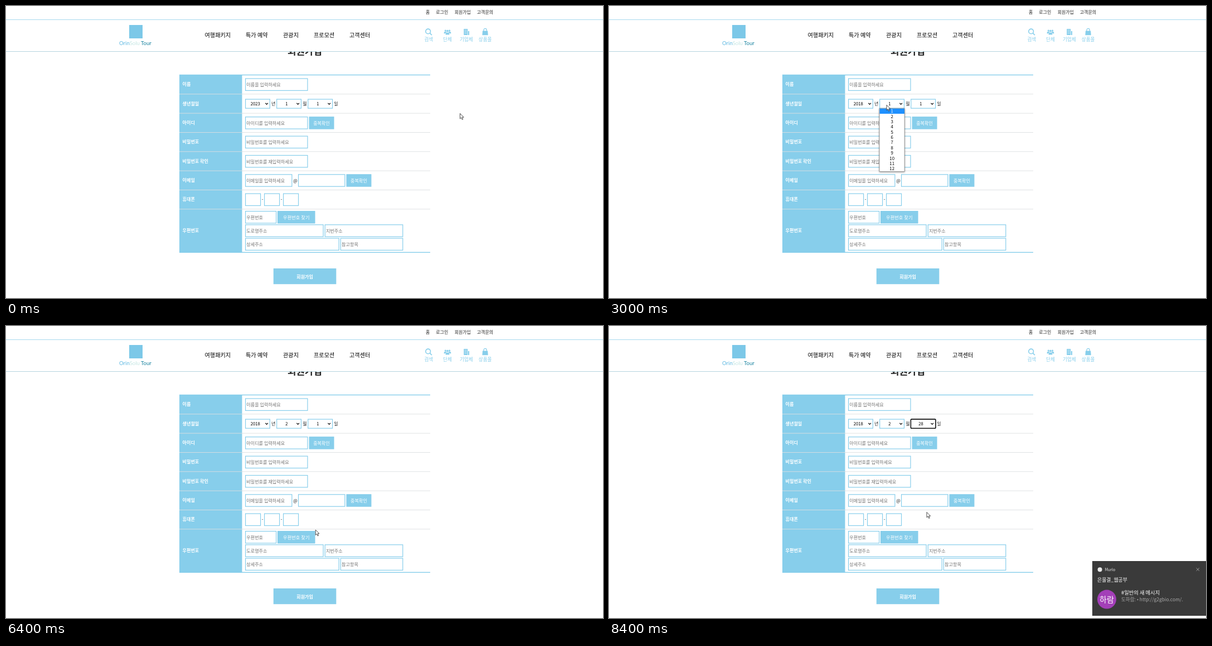
An HTML page that plays this animation: 1071 by 523 pixels, repeating every 8.47 s.

```html
<!DOCTYPE html>
<html>
<head>
<meta charset="utf-8">
<title>회원가입</title>
<style>
html, body { margin: 0; width: 100%; height: 100%; overflow: hidden; background: #fff; }
svg { display: block; }
text { font-family: "Noto Sans CJK KR", "Noto Sans CJK", "Noto Sans", sans-serif; white-space: pre; }
.list { filter: drop-shadow(0 1px 1.5px rgba(0, 0, 0, .4)); }
</style>
</head>
<body>
<svg id="stage" width="1071" height="523" viewBox="0 0 1071 523"></svg>
<script>
const SKY = '#87ceeb', GREY = '#757575', LOOP = 8470;
const ROW = 9.38, LIST_TOP = 183.6, VISIBLE = 20;
const stage = document.getElementById('stage');
const $ = id => document.getElementById(id);

// cy is the vertical middle of the glyphs
function text(x, cy, str, size, { fill = '#222', weight = 400, anchor = 'start', extra = '' } = {}) {
  return `<text x="${x}" y="${cy + size * .37}" font-size="${size}" fill="${fill}" font-weight="${weight}" text-anchor="${anchor}" ${extra}>${str}</text>`;
}
function rect(x, y, w, h, fill, extra = '') {
  return `<rect x="${x}" y="${y}" width="${w}" height="${h}" fill="${fill}" ${extra}/>`;
}
function outline(x, y, w, h) {
  return rect(x + .6, y + .6, w - 1.2, h - 1.2, '#fff', `stroke="${SKY}" stroke-width="1.2"`);
}
function button(x, y, w, h, label, size = 8.15, weight = 400) {
  return rect(x, y, w, h, SKY) +
    text(x + w / 2, y + h / 2 + .5, label, size, { fill: '#fff', anchor: 'middle', weight });
}

// x, y, width, placeholder
const INPUT_H = 22.6;
const inputs = [
  [429, 129.4, 112.6, '이름을 입력하세요'],
  [429, 198.1, 112.6, '아이디를 입력하세요'],
  [429, 232.5, 112.6, '비밀번호를 입력하세요'],
  [429, 266.9, 112.6, '비밀번호를 재입력하세요'],
  [429, 301.2, 84.5, '이메일을 입력하세요'],
  [524, 301.2, 84.5, ''],
  [429, 335.5, 28.2, ''], [463, 335.5, 28.2, ''], [497, 335.5, 28.2, ''],
  [429, 367, 56.3, '우편번호'],
  [429, 391.2, 140.7, '도로명주소'], [571.7, 391.2, 140.7, '지번주소'],
  [429, 415.4, 168.9, '상세주소'], [599.8, 415.4, 112.6, '참고항목']
];

function header() {
  const nav = [[356.5, '여행패키지'], [430, '특가 예약'], [497, '관광지'], [552, '프로모션'], [616, '고객센터']];
  const top = [[753, '홈'], [771.3, '로그인'], [804.7, '회원가입'], [844.8, '고객문의']];
  const tools = [[758.3, '검색'], [792, '단체'], [825.8, '기업체'], [859.6, '상품몰']];
  const person = (x, y, s) => `<g transform="translate(${x} ${y}) scale(${s})"><circle cy="-3" r="2.2"/><path d="M-3.6 4V2a2.4 2.4 0 0 1 2.4-2.4h2.4A2.4 2.4 0 0 1 3.6 2V4Z"/></g>`;
  const windows = [0, 1, 2].map(r => [0, 1].map(c =>
    rect(823.2 + c * 2.3, 42.6 + r * 2.7, 1.1, 1.3, '#fff')).join('')).join('');
  return rect(0, 0, 1071, 81, '#fff') +
    rect(0, 24, 1071, 1, '#a8daee') + rect(0, 81, 1071, 1, '#b5d5df') +
    top.map(([x, s]) => text(x, 11.2, s, 7.95)).join('') +
    nav.map(([x, s]) => text(x, 52, s, 10.15, { weight: 500, fill: '#000' })).join('') +
    tools.map(([x, s]) => text(x, 60.2, s, 8.6, { fill: SKY, anchor: 'middle' })).join('') +
    rect(221, 34, 24, 24, '#7cc8e8') +
    `<text x="203" y="69.5" style="font-family:Lato,sans-serif" font-size="9.6" fill="#5fb9e2">Orin<tspan fill="#c4e6e2">Solu</tspan><tspan fill="#17829f"> Tour</tspan></text>` +
    `<g fill="none" stroke="${SKY}" stroke-width="1.6"><circle cx="757.2" cy="45.4" r="4.3"/><path d="M760.4 48.6L764 52.2"/></g>` +
    `<g fill="${SKY}">` + person(788.4, 46.3, .75) + person(795.6, 46.3, .75) +
    `<g stroke="#fff" stroke-width=".6">${person(792, 47.7, 1)}</g>` +
    `<path d="M821.3 41H828.2V52H821.3ZM829 45H831V52H829Z"/>${windows}` +
    `<path d="M855 44.5H864.2L864.8 52.3H854.4Z"/></g>` +
    `<path d="M857 46V43a2.6 2.6 0 0 1 5.2 0V46" fill="none" stroke="${SKY}" stroke-width="1.2"/>`;
}

function form() {
  const labels = ['이름', '생년월일', '아이디', '비밀번호', '비밀번호 확인', '이메일', '휴대폰', '우편번호'];
  const step = 34.34;
  let out = text(536, 80.8, '회원가입', 16.9, { weight: 700, anchor: 'middle' });
  out += rect(311, 123, 112.5, 318.6, SKY);
  labels.forEach((s, i) => {
    if (i) out += rect(311, 123 + i * step, 450, .9, '#dcdfe1');
    out += text(316.5, i < 7 ? 140.2 + i * step : 402, s, 8.1, { weight: 700, fill: '#fff' });
  });
  out += rect(311, 122.8, 450, 1.4, SKY) + rect(311, 440.6, 450, 1.4, SKY);
  inputs.forEach(([x, y, w, s]) => {
    out += outline(x, y, w, INPUT_H) + text(x + 2.2, y + INPUT_H / 2 + .3, s, 8.15, { fill: GREY });
  });
  [[476, 174.8, '년'], [532.3, 174.8, '월'], [588.3, 174.8, '일'], [515.2, 312.8, '@'], [458.7, 346.5, '-'], [492.8, 346.5, '-']]
    .forEach(([x, y, s]) => out += text(x, y, s, 8));
  return out +
    button(543.6, 198.1, 45, INPUT_H, '중복확인') +
    button(610.5, 301.2, 45, INPUT_H, '중복확인') +
    button(487, 367, 67.6, INPUT_H, '우편번호 찾기', 8.25) +
    button(479.8, 470, 112.6, 28.2, '회원가입', 8.1, 700);
}

const range = (n, f) => Array.from({ length: n }, (_, i) => f(i));
// open..close: list shown; ring..blur: focus ring shown
const selects = [
  { x: 429, items: range(20, i => 2023 - i), total: 124, picked: 2018, open: 930, close: 1670, ring: 1730, blur: 2870 },
  { x: 485.1, items: range(12, i => i + 1), total: 12, picked: 2, open: 2930, close: 4070, ring: 4130, blur: 4600 },
  { x: 541.2, items: range(28, i => i + 1), total: 28, picked: 28, open: 4600, close: 6400, ring: 6465, blur: LOOP }
];
const TRACK = 169;

function selectBox(s, i) {
  return outline(s.x, 166.4, 45, 17.4) +
    `<rect id="ring${i}" x="${s.x + .2}" y="166.9" width="44.6" height="16.4" rx="1.8" fill="#fff" stroke="#101010" stroke-width="1.6"/>` +
    text(s.x + 18.2, 175, s.items[0], 7.7, { fill: '#000', anchor: 'middle', extra: `id="value${i}"` }) +
    `<path d="M${s.x + 36.3} 173.9l2.3 2.3 2.3-2.3" fill="none" stroke="#000" stroke-width="1.2"/>`;
}

function listBox(s, i) {
  const rows = Math.min(s.items.length, VISIBLE), h = rows * ROW;
  const bar = s.total > VISIBLE, w = bar ? 35.3 : 45;
  let out = `<g id="list${i}" class="list">` +
    rect(s.x, LIST_TOP - .3, 45, h + .6, '#fff', 'stroke="#7c7c7c" stroke-width=".7"') +
    `<svg x="${s.x}" y="${LIST_TOP}" width="45" height="${h}"><g id="rows${i}">` +
    rect(.3, 0, w - .3, ROW, '#1e90ff', `id="mark${i}"`) +
    s.items.map((v, k) => text(bar ? 18.2 : 22.6, (k + .5) * ROW, v, 7.9, { fill: '#000', anchor: 'middle' })).join('') +
    '</g></svg>';
  if (bar) {
    const x = s.x + w, mid = x + 4.7;
    out += rect(x, LIST_TOP, 9.4, h, '#f1f1f1') +
      rect(x + .9, 193.6, 7.4, TRACK * VISIBLE / s.total, '#c1c1c1', `id="thumb${i}"`) +
      `<path d="M${mid - 2} 190l2-2.2 2 2.2Z" fill="#a3a3a3"/><path d="M${mid - 2} 365l2 2.2 2-2.2Z" fill="#505050"/>`;
  }
  return out + '</g>';
}

function toast() {
  return `<g id="toast">` + rect(0, 421, 206, 98, '#3a3a3a') +
    '<circle cx="13.6" cy="436.2" r="4" fill="#e8e8e8"/>' +
    text(22.4, 436.3, 'Murlo', 7, { fill: '#e6e6e6' }) +
    '<path d="M186.6 433.3l5.4 5.4m0-5.4l-5.4 5.4" stroke="#b5b5b5" stroke-width=".8"/>' +
    text(9, 455, '은물결_웹공부', 8.9, { fill: '#fff', weight: 500 }) +
    '<circle cx="26" cy="489.6" r="17" fill="#a33fb8"/>' +
    text(26, 489.8, '하람', 14, { fill: '#fff', anchor: 'middle' }) +
    text(52, 477.6, '#일반의 새 메시지', 9.3, { fill: '#fff', weight: 500 }) +
    text(52, 489.4, '도하람: • http://g2gbio.com/.', 8.55, { fill: '#a8a8a8' }) + '</g>';
}

stage.innerHTML = form() + header() + selects.map(selectBox).join('') + selects.map(listBox).join('') + toast() +
  '<path id="arrow" d="M0 0V9.4L2.2 7.4 3.8 11 5.3 10.3 3.8 6.8H6.7Z" fill="#fff" stroke="#222" stroke-width=".8"/>' +
  '<path id="beam" d="M-2.3-5.6H2.3M0-5.6V5.6M-2.3 5.6H2.3" fill="none" stroke="#222" stroke-width=".9"/>';

// time, x, y of the pointer
const path = [
  [0, 814.5, 192.5], [10, 814.5, 192.5], [870, 440.5, 171.6], [1210, 440.5, 171.6], [1470, 453, 233],
  [1810, 453, 233], [2000, 479, 210], [2330, 484, 179], [2810, 484, 179], [2930, 498, 177.3],
  [3210, 498, 177.3], [3530, 507, 230], [3610, 507, 230], [3800, 509.3, 210.6], [3950, 510, 198],
  [4130, 510, 198], [4470, 564, 175.6], [4810, 564, 175.6], [4930, 573, 198], [5000, 578, 207],
  [5270, 578, 207], [5680, 579, 257], [5880, 567, 325], [6070, 554.3, 361.3], [6129, 554.3, 361.3],
  [6130, 555.3, 365], [6500, 555.3, 365], [7000, 559.7, 328.3], [7200, 562, 323.6], [7270, 562, 323.6],
  [7670, 561.3, 332.3], [7940, 561.3, 332.3], [8130, 565.3, 333.5], [8210, 565.3, 333.5],
  [8400, 570, 333.5], [LOOP, 570, 333.5]
];
const clamp = (v, a, b) => Math.min(b, Math.max(a, v));
const show = (el, on) => el.setAttribute('display', on ? 'inline' : 'none');
const move = (el, x, y) => el.setAttribute('transform', `translate(${x} ${y})`);

function pointerAt(t) {
  const k = path.findIndex(p => p[0] > t);
  const [t0, x0, y0] = path[k - 1], [t1, x1, y1] = path[k];
  const p = (t - t0) / (t1 - t0), e = p * p * (3 - 2 * p);
  return [x0 + (x1 - x0) * e, y0 + (y1 - y0) * e];
}

function drawList(s, i, x, y) {
  const onBar = s.total > VISIBLE && x > s.x + 35;
  const hidden = s.items.length - VISIBLE;
  const drag = hidden > 0 ? clamp((y - 207) / 48, 0, 1) : 0;
  const scroll = drag * hidden * ROW;
  const index = onBar ? 1 : clamp(Math.floor((y - LIST_TOP + scroll) / ROW), 0, s.items.length - 1);
  const rows = $('rows' + i), thumb = $('thumb' + i);
  move(rows, 0, -scroll);
  move($('mark' + i), 0, index * ROW);
  rows.querySelectorAll('text').forEach((el, k) => el.setAttribute('fill', k === index ? '#fff' : '#000'));
  if (thumb) {
    move(thumb, 0, drag * (TRACK - TRACK * VISIBLE / s.total));
    thumb.setAttribute('fill', !onBar ? '#c1c1c1' : drag > .02 && drag < 1 ? '#787878' : '#a8a8a8');
  }
}

function draw(t) {
  const [x, y] = pointerAt(t);
  let anyOpen = false;
  selects.forEach((s, i) => {
    const open = t >= s.open && t < s.close;
    anyOpen = anyOpen || open;
    show($('list' + i), open);
    show($('ring' + i), t >= s.ring && t < s.blur);
    $('value' + i).textContent = t >= (i < 2 ? s.close : s.ring) ? s.picked : s.items[0];
    if (open) drawList(s, i, x, y);
  });
  const typing = !anyOpen && inputs.some(([ix, iy, w]) => x >= ix && x <= ix + w && y >= iy && y <= iy + INPUT_H);
  show($('arrow'), !typing);
  show($('beam'), typing);
  move($(typing ? 'beam' : 'arrow'), x, y);
  const left = 1 - clamp((t - 6840) / 520, 0, 1);
  show($('toast'), left < 1);
  move($('toast'), 867 + 204 * left ** 3, 0);
}

const start = performance.now();
function tick() {
  draw((performance.now() - start) % LOOP);
  requestAnimationFrame(tick);
}
tick();
</script>
</body>
</html>
```
